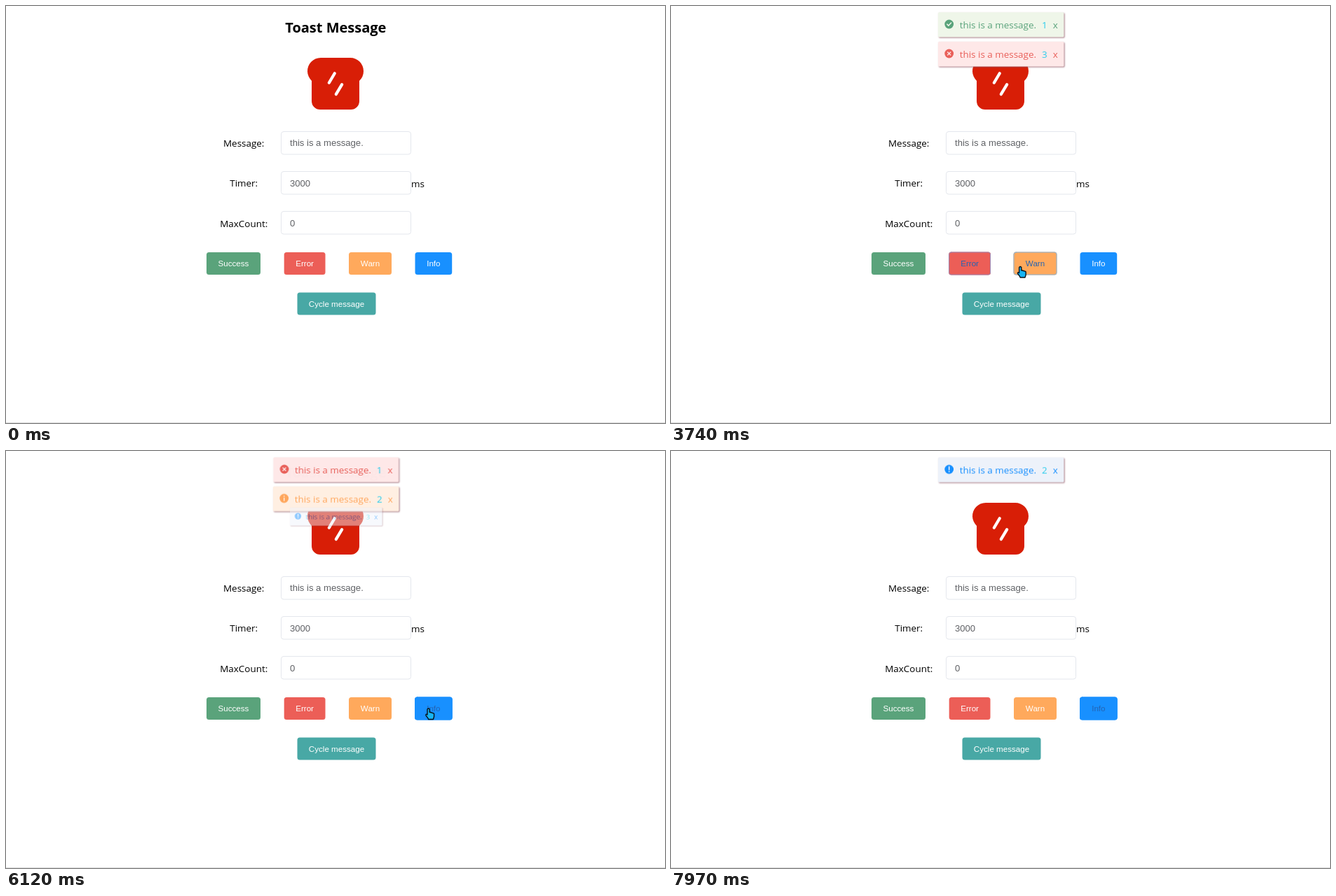
Write an HTML page with a canvas that moves like this. It is 940x596 px and loops after 8000 ms.

```html
<!DOCTYPE html>
<html lang="en">
<head>
<meta charset="utf-8">
<title>Toast Message</title>
<style>
html, body { margin: 0; width: 100%; height: 100%; overflow: hidden; background: #fff; }
canvas { display: block; }
</style>
</head>
<body>
<canvas id="stage" width="940" height="596"></canvas>
<script>
const stage = document.getElementById('stage').getContext('2d');
const layer = document.createElement('canvas');
layer.width = 220;
layer.height = 70;
const layerCtx = layer.getContext('2d');

const LOOP = 8000, FADE = 400, LIFE = 3080, SLOT = 42;
const UI = '13.45px "Open Sans", "Noto Sans", sans-serif';
const ARIAL = '"Liberation Sans", Arial, sans-serif';
const MESSAGE = 'this is a message.';

const toasts = [
  { start: 1524, icon: 'check', color: '#5aa37b', back: '#eff6e9' },
  { start: 3034, icon: 'cross', color: '#e9605a', back: '#fee8e8' },
  { start: 4528, icon: 'i', color: '#ffa75d', back: '#ffefe2' },
  { start: 6010, icon: '!', color: '#1890ff', back: '#edf2fa' }
];

// from/to: the time a button holds the keyboard focus
const buttons = [
  { label: 'Success', x: 286, y: 352, w: 77, color: '#5aa37b', from: 1400, to: 2890, edge: '#5d9fb0' },
  { label: 'Error', x: 396.7, y: 352, w: 58.8, color: '#ec5e57', from: 2890, to: 4210, edge: '#9a86b4' },
  { label: 'Warn', x: 489, y: 352, w: 61, color: '#ffa95c', from: 4210, to: 5640, edge: '#86b4dc' },
  { label: 'Info', x: 583.5, y: 352, w: 52.7, color: '#1890ff', from: 5640, to: LOOP, edge: '#1890ff' },
  { label: 'Cycle message', x: 415.5, y: 409.5, w: 112, color: '#48a8a5', from: 0, to: 0 }
];

// time, x, y of the pointer tip
const pointerPath = [
  [330, 341, 542], [480, 340, 500], [620, 339, 457], [790, 327, 388],
  [950, 323.7, 367], [1900, 323.7, 367], [2240, 424, 372], [2570, 424, 372],
  [2900, 426.5, 373.5], [3350, 426.5, 373.5], [3600, 470, 375], [3880, 526, 369],
  [4220, 528.2, 366.5], [4750, 528.2, 366.5], [5080, 598.3, 369], [5450, 598.3, 369],
  [5650, 602.3, 367.5], [6460, 602.8, 367.5], [6550, 608.5, 371], [6810, 906, 572]
];

const clamp = v => Math.min(1, Math.max(0, v));

// CSS "ease": cubic-bezier(.25, .1, .25, 1)
function ease(x) {
  if (x <= 0 || x >= 1) return clamp(x);
  const bez = (a, b, u) => 3 * a * u * (1 - u) ** 2 + 3 * b * u * u * (1 - u) + u ** 3;
  let lo = 0, hi = 1;
  for (let i = 0; i < 24; i++) {
    const mid = (lo + hi) / 2;
    if (bez(.25, .25, mid) < x) lo = mid; else hi = mid;
  }
  return bez(.1, 1, lo);
}

function text(c, str, x, y, font, color, align = 'left') {
  c.font = font;
  c.fillStyle = color;
  c.textAlign = align;
  c.fillText(str, x, y);
}

function roundBox(c, x, y, w, h, r) {
  c.beginPath();
  c.roundRect(x, y, w, h, r);
}

function line(c, points, width, color) {
  c.beginPath();
  points.forEach(([x, y]) => c.lineTo(x, y));
  c.lineWidth = width;
  c.lineCap = c.lineJoin = 'round';
  c.strokeStyle = color;
  c.stroke();
}

function drawBread(c) {
  c.beginPath();
  c.arc(491, 93, 19, -Math.PI / 2, .82);
  c.arcTo(504, 148, 470, 148, 12);
  c.arcTo(436, 148, 436, 107, 12);
  c.arc(449, 93, 19, Math.PI - .82, Math.PI * 1.5);
  c.closePath();
  c.fillStyle = '#d81e06';
  c.fill();
  line(c, [[468.8, 96.2], [460.8, 109.8]], 4.2, '#fff');
  line(c, [[479.2, 112.2], [470.8, 126.2]], 4.2, '#fff');
}

function drawField(c, label, value, row) {
  const y = 179.5 + row * 57.4;
  roundBox(c, 392.5, Math.round(y) - .5, 185, 32.5, 3.5);
  c.lineWidth = 1;
  c.strokeStyle = '#e4e7ed';
  c.stroke();
  text(c, label, 339.2, y + 21.5, UI, '#000', 'center');
  text(c, value, 405, y + 20.7, '13.1px ' + ARIAL, '#606266');
}

function drawButton(c, b, t, pointer) {
  const hovered = pointer && isOver(b, pointer);
  const active = hovered || (t >= b.from && t < b.to);
  const grow = active ? .5 : 0;
  roundBox(c, b.x - grow, b.y - grow, b.w + 2 * grow, 32 + 2 * grow, 3.5);
  c.fillStyle = b.color;
  c.fill();
  if (active) {
    roundBox(c, b.x, b.y, b.w, 32, 3);
    c.lineWidth = 1;
    c.strokeStyle = b.edge;
    c.stroke();
  }
  text(c, b.label, b.x + b.w / 2, b.y + 20, '11.6px ' + ARIAL, active ? '#2463b3' : '#fff', 'center');
}

function drawIcon(c, kind, color, back) {
  c.beginPath();
  c.arc(-74.3, -1, 6.4, 0, 7);
  c.fillStyle = color;
  c.fill();
  c.save();
  c.translate(-74.3, -1);
  if (kind === 'check') line(c, [[-2.8, .1], [-.8, 2.1], [2.9, -1.9]], 1.5, back);
  if (kind === 'cross') {
    line(c, [[-2, -2], [2, 2]], 1.4, back);
    line(c, [[-2, 2], [2, -2]], 1.4, back);
  }
  if (kind === 'i') {
    line(c, [[0, -3.1], [0, -3]], 1.6, back);
    line(c, [[0, -.5], [0, 3.2]], 1.4, back);
  }
  if (kind === '!') {
    line(c, [[0, -3.6], [0, .6]], 1.6, back);
    line(c, [[0, 3.2], [0, 3.3]], 1.7, back);
  }
  c.restore();
}

function paintToast(c, toast, count) {
  c.clearRect(0, 0, layer.width, layer.height);
  c.save();
  c.translate(110, 35);
  c.shadowColor = 'rgba(140, 80, 95, .75)';
  c.shadowBlur = 2;
  c.shadowOffsetX = c.shadowOffsetY = 1;
  roundBox(c, -90, -18, 179.5, 35.5, 1.5);
  c.fillStyle = toast.back;
  c.fill();
  c.shadowColor = 'transparent';
  drawIcon(c, toast.icon, toast.color, toast.back);
  text(c, MESSAGE, -59.3, 4.6, UI, toast.color);
  text(c, count, 58, 4.6, UI, '#2accec');
  text(c, 'x', 73.7, 4.6, UI, toast.color);
  c.restore();
}

function drawToast(c, toast, index, t) {
  const age = t - toast.start;
  if (age <= 0 || age >= LIFE + FADE) return;
  const enter = ease(age / FADE);
  const leave = ease((age - LIFE) / FADE);
  const shown = enter * (1 - leave);
  const slot = toasts.slice(0, index)
    .reduce((sum, other) => sum + 1 - ease((t - other.start - LIFE) / FADE), 0);
  const count = age < 1040 ? 3 : age < 2085 ? 2 : 1;
  const scale = .5 + .5 * shown;
  paintToast(layerCtx, toast, count);
  c.save();
  c.globalAlpha = shown;
  c.translate(471, 27 + SLOT * slot - 31.5 * (1 - enter));
  c.scale(scale, scale);
  c.drawImage(layer, -110, -35);
  c.restore();
}

function pointerAt(t) {
  const last = pointerPath[pointerPath.length - 1];
  if (t < pointerPath[0][0] || t > last[0] + 40) return null;
  const next = pointerPath.findIndex(p => p[0] > t);
  if (next < 0) return { x: last[1], y: last[2] };
  const [t0, x0, y0] = pointerPath[next - 1];
  const [t1, x1, y1] = pointerPath[next];
  const k = (t - t0) / (t1 - t0);
  return { x: x0 + (x1 - x0) * k, y: y0 + (y1 - y0) * k };
}

function isOver(b, p) {
  return p.x >= b.x && p.x <= b.x + b.w && p.y >= b.y && p.y <= b.y + 32;
}

const HAND = new Path2D('M-1.6 9.5V1.6Q0-.6 1.6 1.6V6Q3 5.2 4 6.6Q5.4 5.9 6 7.2Q8 6.8 8 8.8V12Q7.6 14 6.8 16H0Q-.6 14-3.4 11Q-4.4 8.8-2.6 8.8Z');
const ARROW = new Path2D('M0 0V14L3.2 11L5.4 16L7.8 15L5.6 10.2H10Z');

function drawPointer(c, p) {
  const shape = buttons.some(b => isOver(b, p)) ? HAND : ARROW;
  c.save();
  c.translate(p.x, p.y);
  c.lineWidth = 1.4;
  c.lineJoin = 'round';
  c.fillStyle = '#16b4f4';
  c.strokeStyle = '#0b1218';
  c.fill(shape);
  c.stroke(shape);
  c.restore();
}

function render(t) {
  const c = stage;
  const pointer = pointerAt(t);
  c.fillStyle = '#fff';
  c.fillRect(0, 0, 940, 596);
  c.fillStyle = '#dfdfdf';
  c.fillRect(0, 595, 940, 1);
  text(c, 'Toast Message', 470.3, 37.5, 'bold 20px "Open Sans", "Noto Sans", sans-serif', '#000', 'center');
  drawBread(c);
  drawField(c, 'Message:', MESSAGE, 0);
  drawField(c, 'Timer:', '3000', 1);
  drawField(c, 'MaxCount:', '0', 2);
  text(c, 'ms', 578, 258.5, UI, '#000');
  buttons.forEach(b => drawButton(c, b, t, pointer));
  toasts.forEach((toast, i) => drawToast(c, toast, i, t));
  if (pointer) drawPointer(c, pointer);
}

const begin = performance.now();
function tick() {
  render((performance.now() - begin) % LOOP);
  requestAnimationFrame(tick);
}
tick();
</script>
</body>
</html>
```
